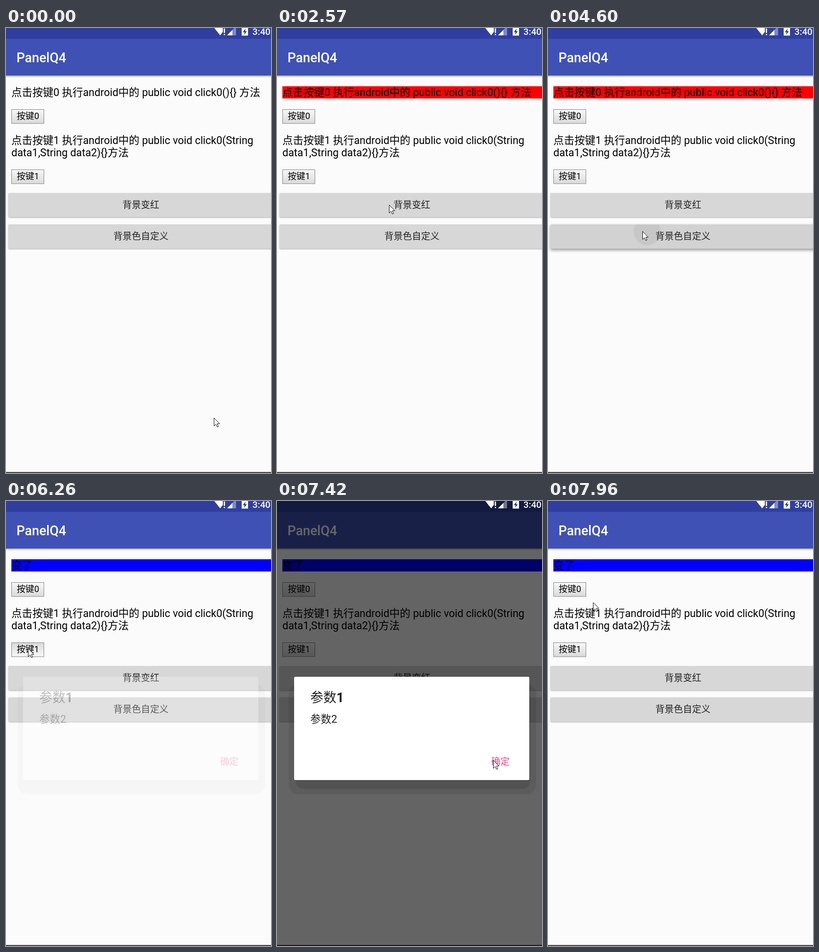
Animation, 542 px wide and 909 px high, one loop 8 s. Source, as an HTML page:

```html
<!DOCTYPE html>
<html lang="zh-CN">
<head>
<meta charset="utf-8">
<style>
  html, body { margin: 0; width: 100%; height: 100%; overflow: hidden; background: #fbfbfb; }
  svg { display: block; }
  text { font-family: Roboto, "Noto Sans CJK SC", "Noto Sans CJK", sans-serif; white-space: pre; }
  .p { font-size: 21.5px; }
  .small { font-size: 17.87px; }
  .label { font-size: 18.75px; fill: #222; text-anchor: middle; }
</style>
</head>
<body>
<svg width="542" height="909" viewBox="0 0 542 909">
  <defs>
    <linearGradient id="key" x2="0" y2="1">
      <stop offset="0" stop-color="#f8f8f8"/><stop offset="1" stop-color="#dadada"/>
    </linearGradient>
    <linearGradient id="keyDown" x2="0" y2="1">
      <stop offset="0" stop-color="#dadada"/><stop offset="1" stop-color="#f8f8f8"/>
    </linearGradient>
    <linearGradient id="fade" x2="0" y2="1">
      <stop offset="0" stop-opacity=".32"/><stop offset="1" stop-opacity="0"/>
    </linearGradient>
  </defs>
  <rect width="542" height="909" fill="#fbfbfb"/>
  <rect y="97" width="542" height="4" fill="url(#fade)"/>
  <rect width="542" height="97" fill="#3f51b5"/>
  <rect width="542" height="22" fill="#303f9f"/>
  <text x="21.5" y="70" font-size="26.8" font-weight="500" fill="#fff">PanelQ4</text>

  <rect id="band" x="11" y="119" width="531" height="25"/>
  <text id="line" class="p" x="11" y="139"></text>
  <text class="p" x="11" y="237">点击按键1 执行android中的 public void click0(String</text>
  <text class="p" x="11" y="262">data1,String data2){}方法</text>
  <g id="keys"></g>
  <g id="buttons"></g>
  <rect y="907" width="542" height="1.6" fill="#111"/>
  <rect id="dim" width="542" height="909"/>

  <g fill="#fff">
    <path d="M426 0H443.500V8L438 15Z"/>
    <path d="M445.500 1H448V10H445.500ZM445.500 12H448V14.500H445.500Z"/>
    <path d="M452 15L463 4V15Z"/>
    <path d="M463 4L470.500 -3.500V15H463Z" opacity=".4"/>
    <path d="M482 0H495V15.500H482Z"/>
    <path d="M490 1L484.500 8.500H488L487 14L492.500 6.500H489Z" fill="#26337f"/>
    <text x="504" y="13.6" font-size="18.75" font-weight="500">3:40</text>
  </g>

  <g id="dialog">
    <rect id="outer" x="24" y="374" width="506" height="225" rx="20" fill-opacity=".08"/>
    <rect id="inner" x="38" y="363" width="480" height="225" rx="16" fill-opacity=".11"/>
    <rect x="35" y="359" width="481" height="211" rx="2.5" fill="#fff"/>
    <text x="68" y="411" font-size="26.8" fill="#212121">参数<tspan font-weight="600">1</tspan></text>
    <text class="p" x="68" y="453" fill="#212121">参数2</text>
    <text x="438" y="539" font-size="18.75" fill="#ff4081">确定</text>
  </g>
  <path id="cursor" d="M.5 .5V17L4.300 13.300L7 19L9.500 18L7 12.300H12Z" fill="#fff" stroke="#111"/>
</svg>
<script>
const $ = id => document.getElementById(id);
const set = (id, name, value) => $(id).setAttribute(name, value);
const clamp = v => Math.min(1, Math.max(0, v));
const smooth = p => p * p * (3 - 2 * p);
const easeOut = p => 1 - (1 - p) ** 1.7;
const LOOP = 8000, TICK = 137;

// Progress from a to b, held between screen updates
function span(t, a, b) {
  const n = Math.round((b - a) / TICK);
  return Math.floor(clamp((t - a) / (b - a)) * n + .001) / n;
}

// Cursor moves: begin, end, and the point reached
const moves = [
  [20, 560, 226, 796], [560, 972, 208, 290], [972, 1110, 302, 356],
  [2430, 2570, 229, 361], [2570, 3120, 8, 272], [3120, 3530, 50, 285],
  [3650, 4200, 193, 415], [4740, 5430, 42, 302], [5550, 5700, 45, 301],
  [6400, 7140, 442, 529], [7420, 7960, 92, 207]
];

const buttons = [
  { y: 337, label: "背景变红", press: 1260, cx: 311, cy: 359 },
  { y: 401.3, label: "背景色自定义", press: 4470, cx: 203, cy: 416 }
];

$("keys").innerHTML = [166.5, 289.5].map((y, i) => `
  <rect id="key${i}" x="11.5" y="${y}" width="66" height="28.5" fill="url(#key)" stroke="#858585"/>
  <text class="small" x="22" y="${y + 19.5}">按键${i}</text>`).join("");

$("buttons").innerHTML = buttons.map((b, i) => {
  const box = `<rect x="5" y="${b.y}" width="542" height="49.5" rx="2"`;
  return `<clipPath id="clip${i}">${box}/></clipPath>
  ${box} id="face${i}"/>
  <circle id="ripple${i}" cx="${b.cx}" cy="${b.cy}" clip-path="url(#clip${i})"/>
  <text class="label" x="276" y="${b.y + 31}">${b.label}</text>`;
}).join("");

function cursorAt(t) {
  let x = 425, y = 796;
  for (const [a, b, toX, toY] of moves) {
    const p = easeOut(span(t, a, b));
    x += (toX - x) * p;
    y += (toY - y) * p;
  }
  return [x, y];
}

function drawButton(b, i, t) {
  const s = Math.floor((t - b.press) / 130) * 130;
  const lift = s < 0 ? 0 : clamp(Math.min(.4 + s / 200, (900 - s) / 400));
  const shade = 214.6 - lift * 4.6;
  set("face" + i, "fill", `rgb(${shade},${shade},${shade})`);
  $("face" + i).style.filter =
    `drop-shadow(0 ${1 + lift * 2}px ${1.2 + lift * 2}px rgba(0,0,0,${.32 + lift * .08}))`;
  set("ripple" + i, "r", s < 0 ? 0 : 8 + s * s / 850);
  set("ripple" + i, "fill-opacity", .05 * clamp((900 - s) / 500));
}

function draw(now) {
  const t = now % LOOP;
  const dim = .6 * (smooth(span(t, 6260, 6670)) - span(t, 7420, 7690));
  const shown = smooth(span(t, 6120, 6530)) * (1 - span(t, 7420, 7690)) ** 3;
  set("cursor", "transform", `translate(${cursorAt(t)})`);
  set("band", "fill", t < 1660 ? "none" : t < 4870 ? "#f00" : "#00f");
  $("line").textContent = t < 4870 ? "点击按键0 执行android中的 public void click0(){} 方法" : "变了";
  set("key1", "fill", t > 6120 && t < 6400 ? "url(#keyDown)" : "url(#key)");
  set("dim", "opacity", dim);
  set("dialog", "opacity", shown);
  set("outer", "opacity", t < 7500 ? 1 : 0);
  set("inner", "opacity", dim > 0 ? 1 : 0);
  buttons.forEach((b, i) => drawButton(b, i, t));
}

const start = performance.now();
function tick(now) {
  draw(Math.max(0, now - start));
  requestAnimationFrame(tick);
}
draw(0);
requestAnimationFrame(tick);
</script>
</body>
</html>
```
